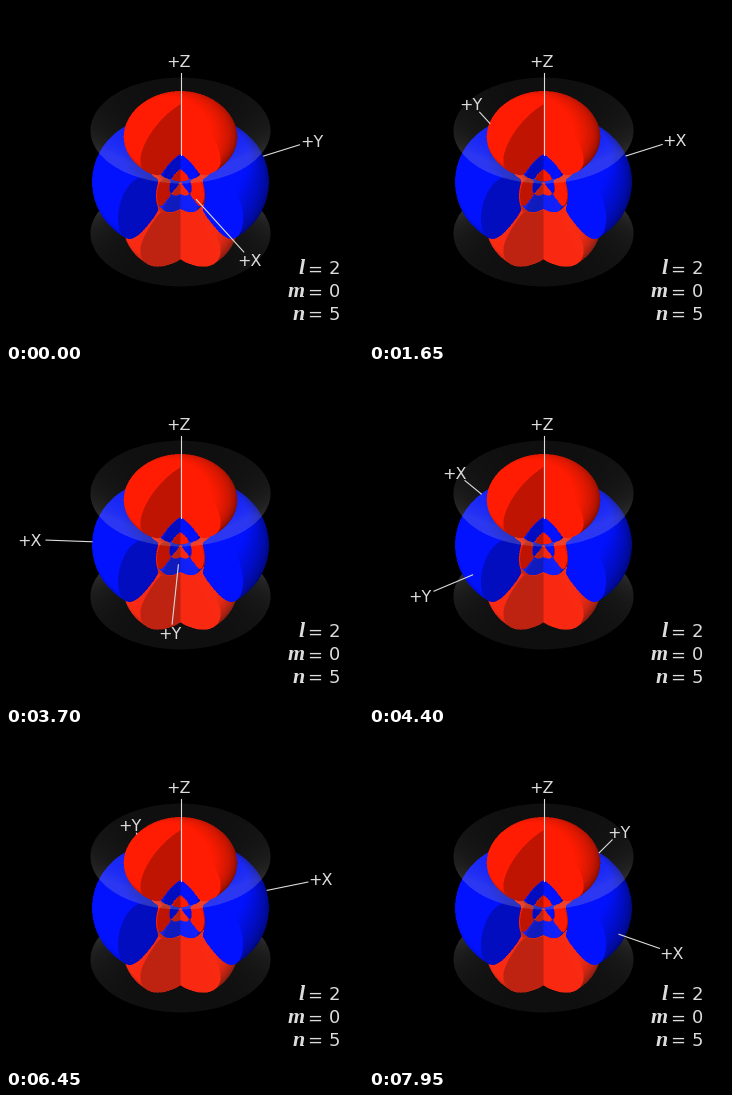
A matplotlib script for the animation above (8000 ms loop, 357 by 335 pixels).

```python
import numpy as np
import matplotlib.pyplot as plt
from matplotlib.animation import FuncAnimation

W, H, DPI = 357, 335, 100
FRAMES, STEP = 160, 50
CX, CY = 174.5, 176.0            # projected centre of the orbital
ELEV = np.radians(36)
S, C = np.sin(ELEV), np.cos(ELEV)
SCALE, LEVEL = 3.5, 0.17         # pixels per radial unit, isosurface value
NODE = SCALE * (7 + np.sqrt(7))  # outer radial node
AXIS_END, LABEL_AT = 135, 150
RIM = 90                         # radius of the nodal cones' rims
RED, BLUE = np.array([255, 28, 2]), np.array([2, 18, 255])
LIGHT = np.array([-0.42, 0.2, 0.88])   # right, up, towards the viewer
GRAY, ALPHA = 190, 0.075
FAR = -1000.0
INK = "#dcdcdc"


def wave(x, y, z):
    """Hydrogen-like state n=5, l=2, m=0."""
    r = np.sqrt(x * x + y * y + z * z) + 1e-9
    rho = r / SCALE
    radial = rho**2 * np.exp(-rho / 2) * (rho**2 / 2 - 7 * rho + 21)
    return radial * (1.5 * (z / r)**2 - 0.5)


def space(sx, sy, t):
    """Screen offset and depth towards the viewer -> x, y (near), z."""
    return sx, t * C - sy * S, sy * C + t * S


def solid(sx, sy, t):
    x, y, z = space(sx, sy, t)
    return (np.abs(wave(x, y, z)) > LEVEL) & (y < np.abs(x))


def trace(sx, sy):
    """Depth of the first solid point on each ray, and the point just before."""
    depth = np.full(sx.shape, FAR)
    todo = np.arange(sx.size)
    for t in np.arange(112.0, -112.0, -1.0):
        found = solid(sx[todo], sy[todo], t)
        depth[todo[found]] = t
        todo = todo[~found]
    hit = depth > FAR
    inner = depth.copy()
    outer = depth + 1
    for _ in range(7):
        mid = (inner + outer) / 2
        inside = solid(sx, sy, mid)
        inner = np.where(inside, mid, inner)
        outer = np.where(inside, outer, mid)
    return hit, np.where(hit, inner, FAR), outer


def lit(nx, ny, nz):
    """Light falling on a surface with the given normal."""
    return nx * LIGHT[0] + (nz * C - ny * S) * LIGHT[1] + (ny * C + nz * S) * LIGHT[2]


def normal(p):
    d = 0.2

    def diff(i):
        a, b = list(p), list(p)
        a[i], b[i] = p[i] - d, p[i] + d
        return np.abs(wave(*a)) - np.abs(wave(*b))

    g = [diff(i) for i in range(3)]
    length = np.sqrt(sum(v * v for v in g)) + 1e-12
    return [v / length for v in g]


def veil(sx, sy, depth):
    """Share of the body's colour left behind the nodal cones."""
    a = C * C - 2 * S * S
    b = -6 * sy * S * C
    c = sx**2 + sy**2 * (S * S - 2 * C * C)
    root = np.sqrt(np.maximum(b * b - 4 * a * c, 0))
    path = np.zeros(sx.shape)
    for sign in (-1, 1):
        t = (-b + sign * root) / (2 * a)
        _, y, z = space(sx, sy, t)
        seen = (np.abs(z) < RIM / np.sqrt(2)) & (t > depth)
        tilt = np.abs(y * C - 2 * z * S) / np.sqrt(6 * z * z + 1e-9)
        path += seen * np.minimum(1 / (tilt + 1e-6), 3.2)   # longer when grazing
    return (1 - ALPHA) ** path


def render():
    x0, x1, y0, y1, n = 80, 270, 66, 290, 2
    px = np.arange(x0, x1, 1 / n) + 0.5 / n
    py = np.arange(y0, y1, 1 / n) + 0.5 / n
    gx, gy = np.meshgrid(px, py)
    sx, sy = (gx - CX).ravel(), (CY - gy).ravel()
    hit, depth, before = trace(sx, sy)

    safe = np.where(hit, depth, 0)
    point = space(sx, sy, safe)
    front = space(sx, sy, np.where(hit, before, 0))
    cut = (front[1] >= np.abs(front[0])) & (np.abs(wave(*front)) > LEVEL)
    half = np.sqrt(0.5)
    light = np.where(cut, lit(-np.sign(sx) * half, half, 0), lit(*normal(point)))
    shade = np.clip(0.68 + 0.55 * light, 0.3, 1)
    tint = np.where((wave(*point) > 0)[:, None], RED, BLUE)
    rgb = tint * (shade * hit)[:, None]
    keep = veil(sx, sy, depth)[:, None]
    rgb = rgb * keep + GRAY * (1 - keep)

    h, w = y1 - y0, x1 - x0
    small = rgb.reshape(h, n, w, n, 3).mean(axis=(1, 3))
    picture = np.zeros((H, W, 3))
    picture[y0:y1, x0:x1] = small / 255
    zmap = np.full((H, W), FAR)
    zmap[y0:y1, x0:x1] = depth.reshape(h, n, w, n)[:, 0, :, 0]
    return np.clip(picture, 0, 1), zmap


def project(r, angle):
    """Screen place and depth of a point in the horizontal plane."""
    far = r * np.sin(angle)
    return CX + r * np.cos(angle), CY - far * S, -far * C


def px(size):
    return size * 72 / DPI


def write(x, y, text, size, **style):
    style = {"family": "DejaVu Sans", "color": INK, **style}
    return ax.text(x, y, text, fontsize=px(size), **style)


picture, zmap = render()

fig = plt.figure(figsize=(W / DPI, H / DPI), dpi=DPI, facecolor="black")
ax = fig.add_axes([0, 0, 1, 1])
ax.imshow(picture, extent=(0, W, H, 0), interpolation="nearest", aspect="auto")
ax.set_xlim(0, W)
ax.set_ylim(H, 0)
ax.axis("off")

ax.plot([CX, CX], [CY - AXIS_END * C, CY - NODE * C], color=INK, lw=px(1.1))
CENTER = {"ha": "center", "va": "center_baseline"}
NUDGE = -1.5                     # labels sit a little left of their axis
write(CX + NUDGE, CY - LABEL_AT * C, "+Z", 16, **CENTER)

for name, value, base in (("l", 2, 268.5), ("m", 0, 291.3), ("n", 5, 314)):
    write(298.5, base, name, 22, family="Liberation Serif", style="italic",
          weight="bold", ha="right", va="baseline")
    write(301, base, "=", 18, ha="left", va="baseline")
    write(334, base, str(value), 18, ha="right", va="baseline")

reach = np.arange(NODE, AXIS_END, 0.5)
arms = []
for name, turn in (("+X", 0), ("+Y", np.pi / 2)):
    line, = ax.plot([], [], color=INK, lw=px(1.1))
    arms.append((line, write(0, 0, name, 16, **CENTER), turn))


def heading(ms):
    """Spin that dies away exponentially."""
    return np.radians(-62 - 798 * (1 - np.exp(-ms * 2.5e-4)))


def update(i):
    angle = heading(i * STEP)
    for line, label, turn in arms:
        x, y, depth = project(reach, angle + turn)
        seen = depth > zmap[y.astype(int), x.astype(int)] - 2.5
        line.set_data(np.where(seen, x, np.nan), y)
        lx, ly, _ = project(LABEL_AT, angle + turn)
        label.set_position((lx + NUDGE, ly))
    return [a for arm in arms for a in arm[:2]]


anim = FuncAnimation(fig, update, frames=FRAMES, interval=STEP,
                     repeat=True, repeat_delay=0, blit=False)
plt.show()
```
